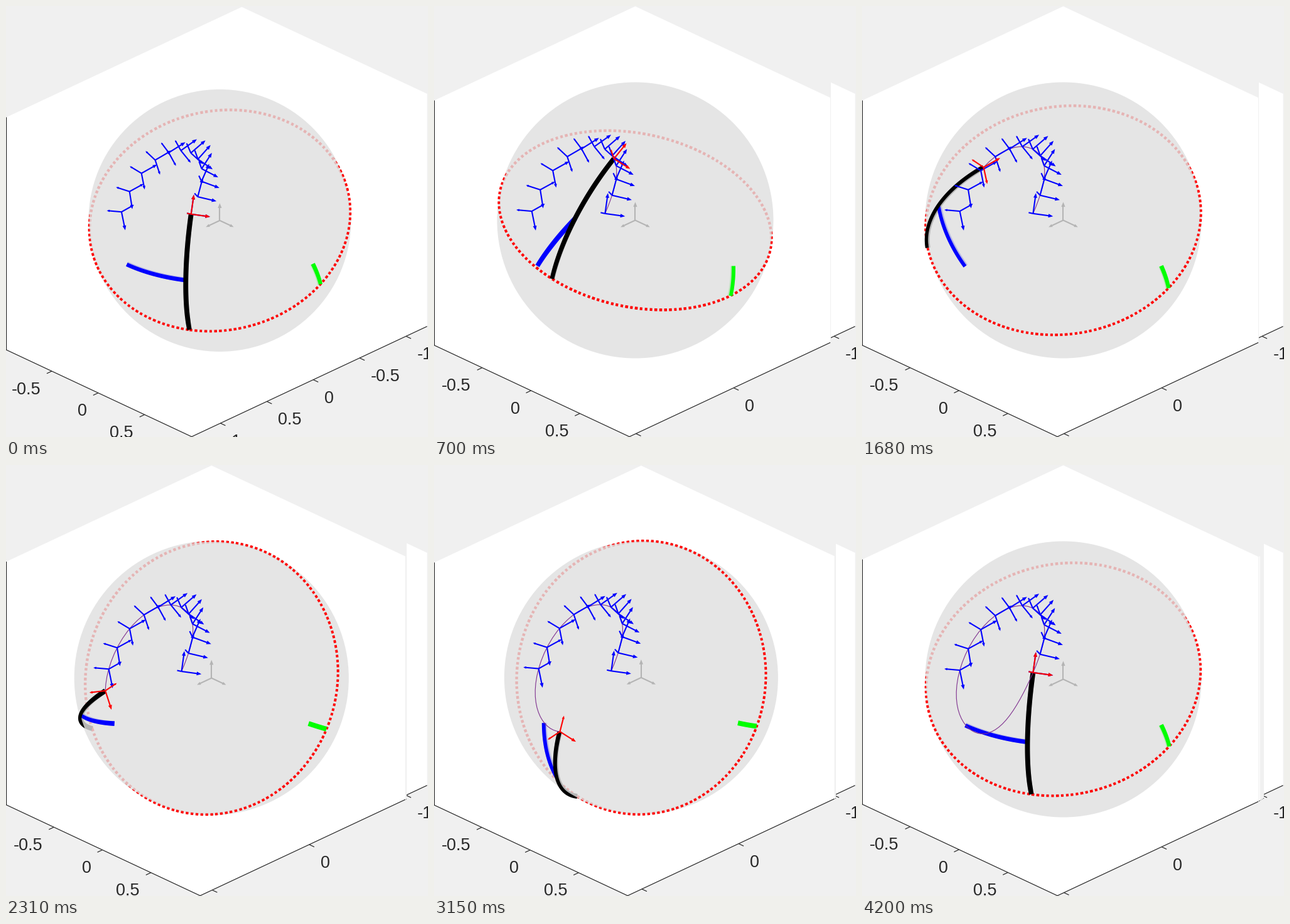
Recreate the animation shown at these times as a matplotlib script. Size 672x687 px, loop 4.27 s.

```python
import numpy as np
import matplotlib.pyplot as plt
from matplotlib.animation import FuncAnimation
from matplotlib.collections import PolyCollection
from matplotlib.patches import Circle, Polygon, Rectangle

W, H, DPI = 672, 687, 96
FRAMES, INTERVAL = 61, 70
PX = 72 / DPI                      # points per pixel

# View: azimuth 135, elevation about 28 degrees
SE, CE, S2 = 0.469, 0.883, np.sqrt(0.5)
VIEW = np.array([[-S2, S2, 0],
                 [-S2 * SE, -S2 * SE, CE],
                 [S2 * CE, S2 * CE, SE]])

SKIN = 0.9935                      # mean radius of the faceted sphere
ARROW, REACH = 0.15, 1.16
YMIN, YMAX, ZMIN, ZMAX = -0.99, 1.007, -0.997, 1.012
INK = (0.15, 0.15, 0.15)
GREY = (240 / 255,) * 3
BLACK, RED, BLUE, GREEN = (0, 0, 0), (1, 0, 0), (0, 0, 1), (0, 1, 0)
PURPLE = (126 / 255, 47 / 255, 142 / 255)
BAR = 7.8

A, B = np.eye(3)[0], np.eye(3)[1]  # ground pivots
C30, C60, C75 = np.cos(np.radians([30, 60, 75]))


def veil(color):
    """Colour as seen through the translucent sphere."""
    return tuple((180 + 49 * c) / 255 for c in color)


def linkage(theta):
    """Crank joint, slider-track pole and tool point for a crank angle."""
    p = np.array([C30, 0.5 * np.cos(theta), 0.5 * np.sin(theta)])
    g = p @ B
    a = (C60 - g * C75) / (1 - g * g)
    b = (C75 - g * C60) / (1 - g * g)
    m = a * p + b * B
    cross = np.cross(p, B)
    n = m + cross * np.sqrt((1 - m @ m) / (cross @ cross))
    return p, n, (p + n) / np.sqrt(3)


def tool_axes(n, t):
    d = (n - C30 * t) / 0.5
    return d, np.cross(d, t), t


ANGLES = np.radians(6 * np.arange(FRAMES))
POSES = [linkage(a) for a in ANGLES]
TRACE = np.array([pose[2] for pose in POSES])
WAYPOINTS = [linkage(a) for a in np.linspace(0, np.pi, 12)]
BASE_X = REACH * WAYPOINTS[-1][2][0]


class Layout:
    """Axes limits and the resulting screen placement."""

    def __init__(self, k):
        if k == 0:
            self.xmin, self.xmax, self.r, self.width = -1.227, 1.31, 209, W
            self.step = 0.5
        else:
            grow = max(0, REACH * POSES[k][2][0] - BASE_X)
            self.xmin, self.xmax = -0.99, BASE_X + grow
            self.r = 220 - 25 * grow
            self.width = 2 * round((632 + 90 * grow) / 2)
            self.step = 1
        self.cx = S2 * self.r * (self.xmax - YMIN)
        self.cy = (686 - S2 * SE * self.r * (self.xmax + YMAX)
                   + CE * self.r * ZMIN)

    def view(self, pts):
        v = np.asarray(pts) @ VIEW.T
        xy = np.stack([self.cx + self.r * v[..., 0],
                       self.cy - self.r * v[..., 1]], -1)
        return xy, v[..., 2]

    def px(self, *pt):
        return self.view(pt)[0]


LAYOUTS = [Layout(k) for k in range(FRAMES)]

fig = plt.figure(figsize=(W / DPI, H / DPI), dpi=DPI, facecolor=GREY)
ax = fig.add_axes([0, 0, 1, 1])


def line(pts, color, width, **kw):
    pts = np.asarray(pts)
    return ax.plot(pts[:, 0], pts[:, 1], color=color, lw=width * PX,
                   solid_capstyle="butt", **kw)[0]


def label(x, y, value, ha):
    return ax.text(x, y, f"{value:g}", ha=ha, va="center_baseline",
                   family="Liberation Sans", size=27 * PX, color=INK,
                   clip_on=True)


def draw_box(lay, z):
    """Walls, axis lines, ticks and labels, cut at the layout's width."""
    x0, x1 = lay.xmin, lay.xmax
    left, low = lay.px(x1, YMIN, ZMIN), lay.px(x1, YMAX, ZMIN)
    right = lay.px(x0, YMAX, ZMIN)
    top_left = lay.px(x1, YMIN, ZMAX)
    walls = [lay.px(x0, YMIN, ZMAX), top_left, left, low, right,
             lay.px(x0, YMAX, ZMAX)]
    parts = [
        ax.add_patch(Rectangle((-1, -1), lay.width + 1, H + 1, fc=GREY, lw=0)),
        ax.add_patch(Polygon(walls, fc="white", lw=0)),
        line([top_left, left, low, right], INK, 1.2),
    ]
    tick = np.array([8, 8 * SE])
    for y in (-0.5, 0, 0.5):
        p = lay.px(x1, y, ZMIN)
        parts += [line([p, p + tick * (-1, 1)], INK, 1.2),
                  label(p[0] - 18, p[1] + 26.5, y, "right")]
    for x in np.arange(-1, 1.1, lay.step):
        p = lay.px(x, YMAX, ZMIN)
        parts += [line([p, p + tick], INK, 1.2),
                  label(p[0] + 18, p[1] + 27, x, "left")]
    window = Rectangle((-0.5, -0.5), lay.width, H, transform=ax.transData)
    for part in parts:
        part.set_clip_path(window)
        part.set_zorder(z)


def band(lay, pts, color, width, z, dash=None):
    """Thick line whose hidden part shows faintly through the sphere."""
    xy, depth = lay.view(pts)
    tan = np.gradient(xy, axis=0)
    tan /= np.linalg.norm(tan, axis=1)[:, None]
    nrm = np.stack([-tan[:, 1], tan[:, 0]], 1)
    rad = xy - (lay.cx, lay.cy)
    dist = np.linalg.norm(rad, axis=1) + 1e-6
    out = (nrm * rad).sum(1) / dist
    rho, h = dist / lay.r, width / 2
    cut = np.where(depth > 0, -lay.r * (1 - SKIN ** 2) / (2 * rho),
                   lay.r * (SKIN - rho))
    cut = np.clip(cut / (np.abs(out) + 1e-6), -h, h)
    lo = np.where(out > 0, cut, -h)
    hi = np.where(out > 0, h, -cut)

    if dash:
        run = np.r_[0, np.cumsum(np.hypot(*np.diff(xy, axis=0).T))]
        starts = np.arange(0, run[-1], sum(dash))
        spans = [np.searchsorted(run, (s, s + dash[0])) for s in starts]
    else:
        spans = [(0, len(xy))]

    def strips(a, b):
        one, two = xy + nrm * a[:, None], xy + nrm * b[:, None]
        return [np.r_[one[i:j + 1], two[i:j + 1][::-1]] for i, j in spans]

    full = np.full(len(xy), h)
    ax.add_collection(PolyCollection(strips(-full, full), fc=veil(color),
                                     lw=0, zorder=z), autolim=False)
    ax.add_collection(PolyCollection(strips(lo, hi), fc=color,
                                     lw=0, zorder=z + 10), autolim=False)


def sweep(a, side, angle, n):
    t = np.linspace(0, angle, n)[:, None]
    return a * np.cos(t) + side * np.sin(t)


def arc(a, b, n=50):
    """Great-circle arc from a to b."""
    angle = np.arccos(a @ b)
    side = (b - a * np.cos(angle)) / np.sin(angle)
    return sweep(a, side, angle, n)


def triad(lay, origin, axes, color, z, head=7.5):
    base = lay.view(origin)[0]
    for axis in axes:
        tip = lay.view(origin + ARROW * axis)[0]
        vec = tip - base
        size = np.hypot(*vec)
        if size < 1:
            continue
        d = vec / size
        scale = head * min(1, (size / (ARROW * lay.r)) ** 2 * 1.1)
        side = np.array([-d[1], d[0]]) * scale * 0.4
        neck = tip - d * scale
        line([base, tip - d * scale * 0.5], color, 2.1, zorder=z)
        ax.add_patch(Polygon([tip, neck + side, neck - side],
                             fc=color, lw=0, zorder=z))


def layers(k):
    """Current layout plus older, wider ones still visible at its right."""
    seen, widest = [], 0
    for j in range(k, -1, -1):
        if LAYOUTS[j].width > widest:
            seen.append(LAYOUTS[j])
            widest = LAYOUTS[j].width
    return seen[::-1]


def update(k):
    ax.cla()
    ax.axis("off")
    ax.set(xlim=(-0.5, W - 0.5), ylim=(H - 0.5, -0.5))
    for i, old in enumerate(layers(k)):
        draw_box(old, 0.1 * i)

    lay = LAYOUTS[k]
    p, n, t = POSES[k]
    foot = (p - C60 * n) / C30
    slider = B - C75 * n
    slider /= np.linalg.norm(slider)

    ax.add_patch(Circle((lay.cx, lay.cy), lay.r, fc=(229 / 255,) * 3,
                        lw=0, zorder=3))
    triad(lay, np.zeros(3), np.eye(3), veil(BLACK), 4, head=9)

    track = sweep(foot, np.cross(n, foot), 2 * np.pi, 2400)
    band(lay, track, RED, 4.4, 5, dash=(4.2, 3.6))
    band(lay, arc(A, p), BLUE, BAR, 6)
    band(lay, arc(B, slider), GREEN, BAR, 6)
    band(lay, sweep(foot, n, np.pi / 3, 80), BLACK, BAR, 7)

    if k:
        line(lay.view(TRACE[:k + 1])[0], PURPLE, 1.1, zorder=20)
    for _, pole, tool in WAYPOINTS:
        triad(lay, tool, tool_axes(pole, tool), BLUE, 21)
    triad(lay, t, tool_axes(n, t), RED, 22)
    return []


anim = FuncAnimation(fig, update, frames=FRAMES, interval=INTERVAL,
                     init_func=lambda: [], repeat=True, repeat_delay=0)
plt.show()
```
